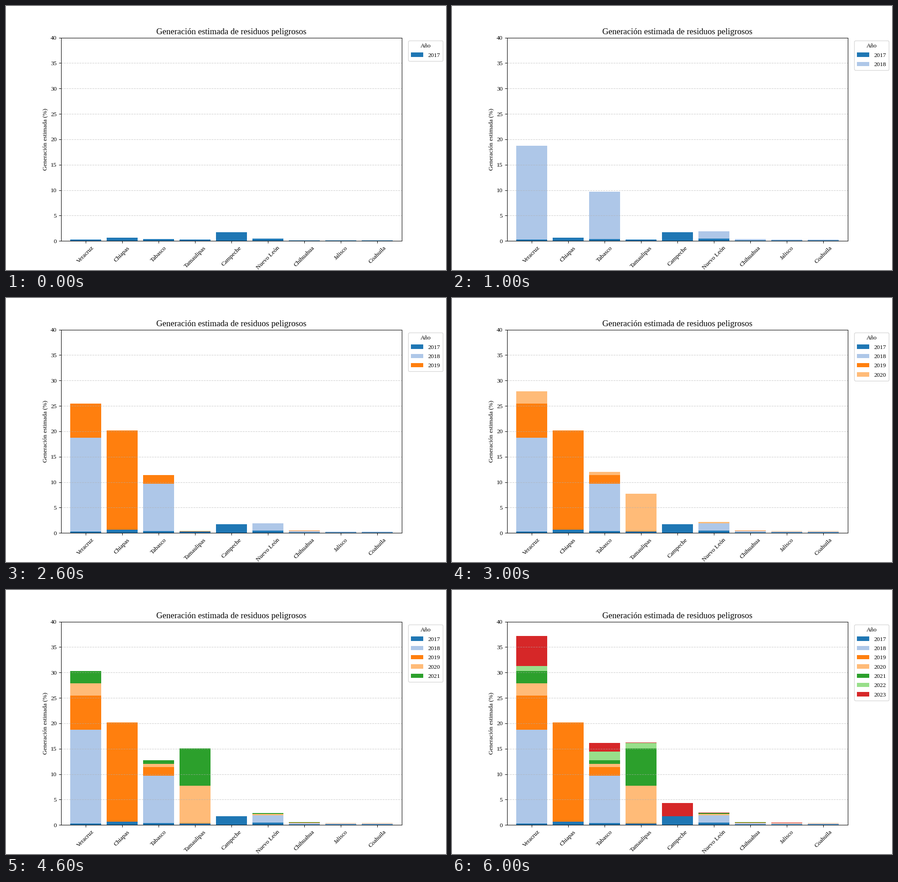
Recreate the animation shown at these times as a matplotlib script. Size 966 by 580 pixels, loop 7 s.

```python
import numpy as np
import matplotlib.pyplot as plt
from matplotlib.animation import FuncAnimation

plt.rcParams["font.family"] = "Liberation Serif"

YEARS = np.arange(2017, 2024)
COLORS = plt.get_cmap("tab20").colors

# Running total (%) at the years where a state's trend bends;
# straight lines in between, flat after the last one
TRACE = {2017: 0.1, 2018: 0.28, 2020: 0.37}
TRENDS = {
    "Veracruz": {2017: 0.28, 2018: 18.73, 2019: 25.45,
                 2021: 30.3, 2022: 31.28, 2023: 37.17},
    "Chiapas": {2018: 0.62, 2019: 20.17},
    "Tabasco": {2017: 0.36, 2018: 9.7, 2019: 11.36, 2021: 12.74, 2023: 16.17},
    "Tamaulipas": {2017: 0.27, 2019: 0.36, 2021: 15.07, 2022: 16.12, 2023: 16.2},
    "Campeche": {2022: 1.72, 2023: 4.35},
    "Nuevo León": {2017: 0.45, 2018: 1.92, 2019: 1.92,
                   2021: 2.38, 2022: 2.38, 2023: 2.46},
    "Chihuahua": {2017: 0.1, 2018: 0.36, 2021: 0.55},
    "Jalisco": {**TRACE, 2022: 0.37, 2023: 0.46},
    "Coahuila": TRACE,
}


def totals(trend):
    return np.interp(YEARS, list(trend), list(trend.values()))


tops = np.array([totals(trend) for trend in TRENDS.values()]).T
layers = np.diff(tops, axis=0, prepend=0)
bases = tops - layers

# Slightly over 966 x 580 px so that truncation lands on the exact size
fig, ax = plt.subplots(figsize=(10.00001, 6.00415), dpi=96.6)


def draw(step):
    ax.clear()
    x = np.arange(len(TRENDS))
    for i in range(step + 1):
        ax.bar(x, layers[i], width=0.85, bottom=bases[i],
               color=COLORS[i], label=str(YEARS[i]))
    ax.set_xlim(-0.675, len(TRENDS) - 0.325)
    ax.set_ylim(0, 40)
    ax.set_xticks(x, list(TRENDS), rotation=45)
    ax.set_title("Generación estimada de residuos peligrosos", fontsize=14)
    ax.set_ylabel("Generación estimada (%)")
    ax.grid(axis="y", linestyle="--", alpha=0.6)
    ax.legend(title="Año", loc="upper left", bbox_to_anchor=(1.0092, 1),
              labelspacing=0.593, borderpad=0.45)


anim = FuncAnimation(fig, draw, frames=len(YEARS), init_func=lambda: draw(0),
                     interval=1000, repeat=True, repeat_delay=0)
plt.show()
```
